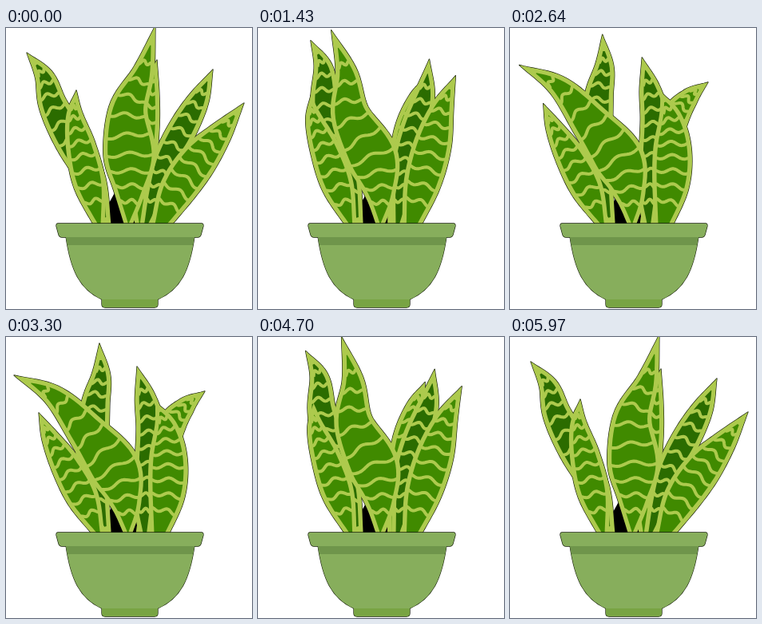
An HTML page with a canvas for the animation above (6000 ms loop, 308 by 352 pixels).

```html
<!DOCTYPE html>
<html lang="en">
<head>
<meta charset="utf-8">
<title>Swaying plant</title>
<style>
  html, body { margin: 0; width: 100%; height: 100%; overflow: hidden; background: #fff; }
  canvas { display: block; width: 308px; height: 352px; }
</style>
</head>
<body>
<canvas id="stage" width="308" height="352"></canvas>
<script>
const ctx = document.getElementById('stage').getContext('2d');
const LOOP = 6000, STEP = 100 / 3, SAMPLES = 48;
const LIME = '#adca4d', GREEN = '#408a00', DARK = '#2b6c00';
// Sway positions of the three poses
const KEYS = [0, 0.634, 0.976];

// Spines run from base to tip; widths are half widths at the same points.
const makeLeaf = (color, bands, base, widths, ...poses) =>
  ({ color, bands, widths, poses: poses.map(pose => [base, ...pose]) });

const backMid = makeLeaf(GREEN, 8, [168, 250], [6, 16, 18, 12, 0],
  [[170, 190], [174, 125], [180, 78], [189, 40]],
  [[182, 190], [193, 130], [208, 90], [224, 63]],
  [[188, 180], [205, 116], [225, 87], [249, 68]]);

const backRight = makeLeaf(DARK, 9, [174, 250], [7, 14, 17, 18, 13, 0],
  [[188, 205], [201, 165], [222, 125], [242, 88], [259, 52]],
  [[178, 205], [181, 165], [190, 122], [197, 80], [198, 37]],
  [[173, 205], [178, 160], [181, 115], [174, 75], [164, 37]]);

const backLeft = makeLeaf(DARK, 9, [128, 250], [4, 17, 21, 18, 12, 0],
  [[108, 190], [81, 140], [59, 97], [48, 61], [26, 31]],
  [[112, 190], [98, 138], [93, 90], [94, 48], [82, 12]],
  [[112, 190], [108, 135], [112, 85], [119, 48], [117, 8]]);

const frontRight = makeLeaf(GREEN, 8, [191, 250], [11, 23, 24, 15, 0],
  [[214, 204], [241, 165], [269, 131], [298, 94]],
  [[203, 196], [212, 146], [219, 100], [228, 60]],
  [[201, 198], [203, 152], [200, 113], [187, 81]]);

const center = makeLeaf(GREEN, 9, [153, 250], [4, 20, 33, 25, 14, 0],
  [[155, 205], [155, 160], [153, 104], [172, 55], [187, -3]],
  [[152, 207], [140, 163], [108, 112], [92, 60], [62, 13]],
  [[150, 208], [136, 165], [101, 119], [60, 74], [10, 48]]);

const frontLeft = makeLeaf(GREEN, 8, [118, 250], [6, 20, 19, 11, 0],
  [[105, 197], [94, 150], [86, 110], [88, 78]],
  [[99, 200], [81, 155], [65, 117], [58, 87]],
  [[97, 203], [75, 161], [55, 125], [41, 95]]);

const leaves = [backMid, backRight, backLeft, frontRight, center, frontLeft];

function blend(vals, p) {
  const [a, b, c] = KEYS;
  return vals[0] * (p - b) * (p - c) / ((a - b) * (a - c))
    + vals[1] * (p - a) * (p - c) / ((b - a) * (b - c))
    + vals[2] * (p - a) * (p - b) / ((c - a) * (c - b));
}

function spline(vals, u) {
  const last = vals.length - 1;
  const i = Math.min(Math.floor(u * last), last - 1);
  const f = u * last - i;
  const b = vals[i], c = vals[i + 1];
  const a = i > 0 ? vals[i - 1] : 2 * b - c;
  const d = i + 2 <= last ? vals[i + 2] : 2 * c - b;
  return b + 0.5 * f * (c - a + f * (2 * a - 5 * b + 4 * c - d + f * (3 * (b - c) + d - a)));
}

function poseLeaf(leaf, p) {
  const [xs, ys] = [0, 1].map(axis =>
    leaf.widths.map((_, k) => blend(leaf.poses.map(pose => pose[k][axis]), p)));
  const at = u => {
    const lo = Math.max(0, u - 0.01), hi = Math.min(1, u + 0.01);
    const dx = spline(xs, hi) - spline(xs, lo);
    const dy = spline(ys, hi) - spline(ys, lo);
    const len = Math.hypot(dx, dy) || 1;
    return {
      x: spline(xs, u), y: spline(ys, u),
      tx: dx / len, ty: dy / len,
      w: Math.max(0, spline(leaf.widths, u))
    };
  };
  return { ...leaf, at, outline: shape(at, 0), inner: shape(at, 5.5) };
}

function shape(at, inset) {
  const left = [], right = [];
  for (let i = 0; i <= SAMPLES; i++) {
    const q = at(i / SAMPLES);
    const w = q.w - inset;
    if (w < 0) continue;
    left.push([q.x + q.ty * w, q.y - q.tx * w]);
    right.unshift([q.x - q.ty * w, q.y + q.tx * w]);
  }
  return polygon([...left, ...right]);
}

function polygon(points) {
  const path = new Path2D();
  points.forEach(([x, y]) => path.lineTo(x, y));
  path.closePath();
  return path;
}

function fill(path, color) {
  ctx.fillStyle = color;
  ctx.fill(path);
}

function edge(path) {
  ctx.strokeStyle = '#141c08';
  ctx.lineWidth = 1.3;
  ctx.stroke(path);
}

function drawBands({ at, bands }) {
  ctx.strokeStyle = LIME;
  ctx.lineWidth = 4;
  for (let i = 1; i <= bands; i++) {
    const q = at(0.06 + 0.87 * i / (bands + 1));
    if (q.w < 7) continue;
    ctx.beginPath();
    for (let s = -1; s <= 1.001; s += 0.1) {
      const side = s * (q.w - 3);
      const wave = 2.4 * Math.sin(s * 5 + i * 0.4) - 2 * s * s;
      ctx.lineTo(q.x - q.ty * side + q.tx * wave, q.y + q.tx * side + q.ty * wave);
    }
    ctx.stroke();
  }
}

function drawLeaf(leaf) {
  fill(leaf.outline, LIME);
  fill(leaf.inner, leaf.color);
  drawBands(leaf);
}

const rim = new Path2D('M65 245H245Q247 245 247 248L244 259Q243 262 240 262H70Q67 262 66 259L63 248Q63 245 65 245Z');
const bowl = new Path2D('M75 261H236C230 303 219 327 190 340H120C92 327 81 303 75 261Z');
const shade = new Path2D('M75 261H236L234 272H77Z');
const foot = new Path2D('M120 340H190V346Q190 350 186 350H124Q120 350 120 346Z');
const soil = polygon([[114, 246], [138, 203], [172, 246]]);

function drawPot() {
  [rim, bowl, foot].forEach(edge);
  fill(foot, '#78a443');
  fill(bowl, '#87ae5c');
  fill(shade, '#6f954b');
  fill(rim, '#87ae5c');
}

function draw(time) {
  const step = Math.floor((time % LOOP + 3.5) / STEP);
  const sway = (1 - Math.cos(2 * Math.PI * step * STEP / LOOP)) / 2;
  const posed = leaves.map(leaf => poseLeaf(leaf, sway));
  const [, back, , front] = posed;

  ctx.fillStyle = '#fff';
  ctx.fillRect(0, 0, 308, 352);
  ctx.lineJoin = 'round';
  posed.forEach(leaf => edge(leaf.outline));

  // Dark gaps between the stems
  fill(soil, '#000');
  const gap = [back.at(0.3), back.at(0.55), front.at(0.5), front.at(0.25)];
  fill(polygon(gap.map(q => [q.x, q.y])), '#000');

  posed.forEach(drawLeaf);
  drawPot();
}

const start = performance.now();
function tick() {
  draw(performance.now() - start);
  requestAnimationFrame(tick);
}
tick();
</script>
</body>
</html>
```
